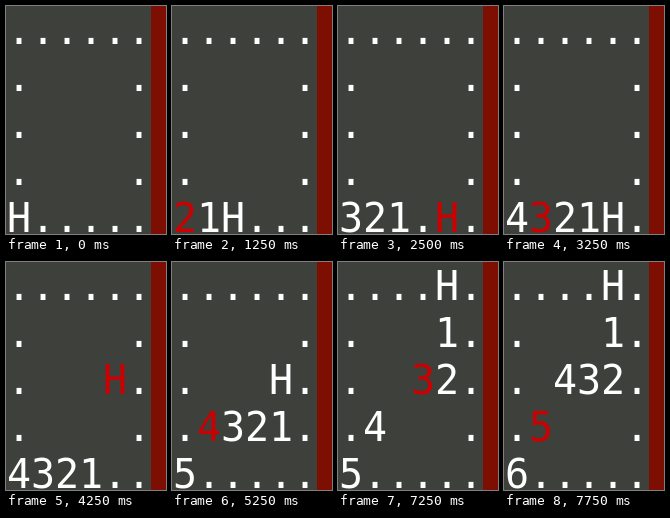
An HTML page with a canvas for the animation above (8000 ms loop, 160 by 228 pixels).

```html
<!DOCTYPE html>
<html lang="en">
<head>
<meta charset="utf-8">
<title>Rope simulation</title>
<style>
  html, body { margin: 0; width: 100%; height: 100%; overflow: hidden; background: #3e403c; }
  canvas { display: block; }
</style>
</head>
<body>
<canvas id="stage" width="160" height="228"></canvas>
<script>
const ctx = document.getElementById('stage').getContext('2d');
const COLS = 6, ROWS = 5, STEP_MS = 250, STEPS = 32;
const NAMES = 'H123456789';

// One step per knot visited: the head moves, then followers until one stays put.
function simulate(moves) {
  const rope = Array.from(NAMES, () => ({ x: 0, y: 0 }));
  const steps = [];
  const record = active => steps.push({ active, rope: rope.map(k => ({ ...k })) });
  record(-1);
  for (const move of moves) {
    if (move === 'R') rope[0].x++; else rope[0].y++;
    record(0);
    for (let i = 1; i < rope.length; i++) {
      const dx = rope[i - 1].x - rope[i].x, dy = rope[i - 1].y - rope[i].y;
      const pulled = Math.max(Math.abs(dx), Math.abs(dy)) > 1;
      if (pulled) {
        rope[i].x += Math.sign(dx);
        rope[i].y += Math.sign(dy);
      }
      record(i);
      if (!pulled) break;
    }
  }
  return steps.slice(0, STEPS);
}

const steps = simulate('RRRRUUUU');

function draw({ active, rope }) {
  ctx.fillStyle = '#3e403c';
  ctx.fillRect(0, 0, 160, 228);
  ctx.fillStyle = '#7c0f02';
  ctx.fillRect(145, 0, 15, 228);
  ctx.font = '40px "DejaVu Sans Mono", monospace';
  for (let y = 0; y < ROWS; y++) {
    for (let x = 0; x < COLS; x++) {
      const knot = rope.findIndex(k => k.x === x && k.y === y);
      const border = x % (COLS - 1) === 0 || y % (ROWS - 1) === 0;
      const glyph = knot >= 0 ? NAMES[knot] : border ? '.' : ' ';
      ctx.fillStyle = knot >= 0 && knot === active ? '#cc0000' : '#fff';
      ctx.fillText(glyph, 1 + x * 24, 226 - y * 47);
    }
  }
}

function tick() {
  draw(steps[Math.floor(performance.now() / STEP_MS) % STEPS]);
  requestAnimationFrame(tick);
}
tick();
</script>
</body>
</html>
```
